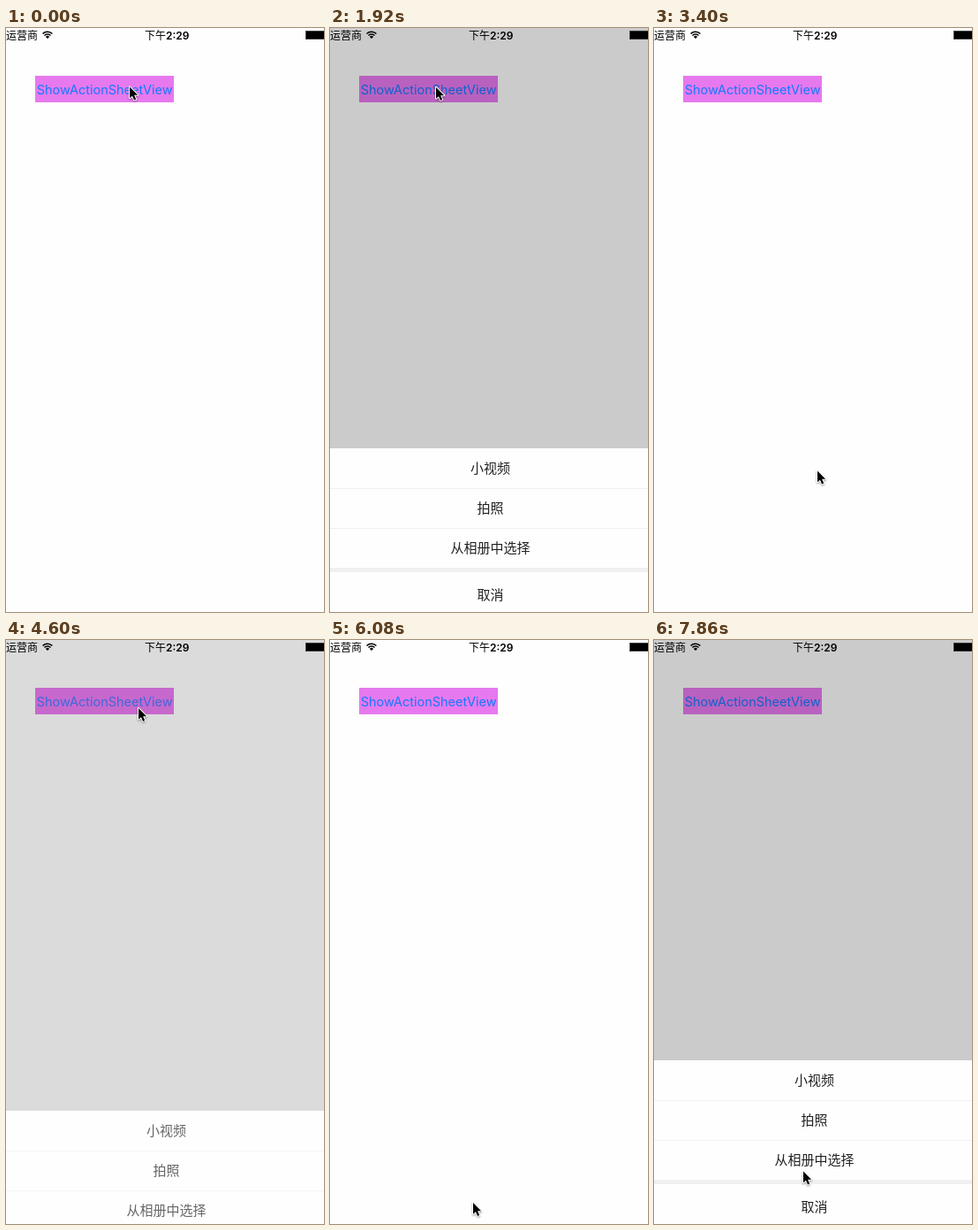
An HTML page with a canvas that plays this animation: 360 by 660 pixels, repeating every 8 s.

```html
<!DOCTYPE html>
<html lang="zh">
<head>
<meta charset="utf-8">
<title>Action sheet</title>
<style>
html, body { margin: 0; width: 360px; height: 660px; overflow: hidden; background: #fefefe; }
canvas { display: block; }
</style>
</head>
<body>
<canvas id="stage" width="360" height="660"></canvas>
<script>
const ctx = document.getElementById('stage').getContext('2d');
const W = 360, H = 660, LOOP = 8000, TICKS = 54, TICK = LOOP / TICKS;
const CJK = '"Noto Sans CJK SC", "Noto Sans CJK", sans-serif';
const LATIN = 'Inter, ' + CJK;
const ROW = 45, GAP = 5, SHEET = 185;
const LABELS = ['小视频', '拍照', '从相册中选择', '取消'];

const RAMP = 1.35;
const opens = [11.15, 30.15, 48.15];
const closes = [21.3, 39.3];

const spot = (x, y) => ({ x, y });
const START = spot(140, 66), BUTTON = spot(120, 66.5), BUTTON_RIGHT = spot(150, 76.5);
const VIDEO = spot(185, 500), ALBUM = spot(169, 600), CANCEL = spot(162, 635.5);

// Pointer legs, each eased from wherever the last one ended
const legs = [
  { at: 0, ticks: 6, to: BUTTON },
  { at: 14, ticks: 3, to: spot(205, 570) },
  { at: 17, ticks: 2, to: VIDEO },
  { at: 23, ticks: 6, to: BUTTON_RIGHT },
  { at: 31, ticks: 5, to: spot(157.5, 635.5) },
  { at: 36, ticks: 2, to: CANCEL },
  { at: 41, ticks: 5, to: BUTTON_RIGHT },
  { at: 50, ticks: 3, to: ALBUM }
];

const smooth = u => {
  u = Math.min(1, Math.max(0, u));
  return u * u * (3 - 2 * u);
};
const ramps = (starts, n) => starts.reduce((sum, s) => sum + smooth((n - s) / RAMP), 0);

const pointer = n => legs.reduce((pos, leg) => {
  const u = smooth((n - leg.at) / leg.ticks);
  return spot(pos.x + (leg.to.x - pos.x) * u, pos.y + (leg.to.y - pos.y) * u);
}, START);

function rect(color, x, y, w, h) {
  ctx.fillStyle = color;
  ctx.fillRect(x, y, w, h);
}

function text(str, x, y, font, color, align = 'left') {
  ctx.font = font;
  ctx.fillStyle = color;
  ctx.textAlign = align;
  ctx.fillText(str, x, y);
}

function wifi(x, y) {
  const a = -Math.PI * 0.75, b = -Math.PI * 0.25;
  ctx.strokeStyle = ctx.fillStyle = '#000';
  ctx.lineWidth = 1.6;
  for (const r of [7.7, 5]) {
    ctx.beginPath();
    ctx.arc(x, y, r, a, b);
    ctx.stroke();
  }
  ctx.beginPath();
  ctx.moveTo(x, y);
  ctx.arc(x, y, 3, a, b);
  ctx.fill();
}

function statusBar() {
  text('运营商', 0, 13, '400 12px ' + CJK, '#000');
  wifi(47, 12);
  text('下午', 157, 13, '500 12px ' + CJK, '#000');
  text('2:29', 181, 12.5, '600 12px ' + LATIN, '#000');
  rect('#444', 339, 3, 21, 10);
  rect('#000', 340, 4, 20, 8);
}

function button(alpha) {
  rect('#e779ee', 33, 54, 157, 30);
  ctx.globalAlpha = alpha;
  text('ShowActionSheetView', 111.7, 74.5, '400 14.5px ' + LATIN, '#147aff', 'center');
  ctx.globalAlpha = 1;
}

function sheet(p) {
  const top = Math.round(H - SHEET * p);
  rect('#fefefe', 0, top, W, H - top);
  ctx.globalAlpha = p;
  LABELS.forEach((label, i) => {
    const last = i === LABELS.length - 1;
    const y = top + ROW * i;
    if (i) rect('#f0f0f0', 0, y, W, last ? GAP : 1);
    text(label, 181.5, y + (last ? 36 : 28), '400 15px ' + CJK, '#222', 'center');
  });
  ctx.globalAlpha = 1;
}

function cursor({ x, y }) {
  ctx.save();
  ctx.translate(x, y + 0.5);
  ctx.scale(0.9, 0.9);
  const arrow = new Path2D('M0 0V14.3L3.3 11.3L5.7 16.6L8 15.6L5.7 10.4L10.2 10.2Z');
  ctx.lineJoin = 'round';
  ctx.lineWidth = 2.2;
  ctx.strokeStyle = '#fff';
  ctx.shadowColor = 'rgba(0,0,0,0.4)';
  ctx.shadowBlur = 2;
  ctx.shadowOffsetY = 1;
  ctx.stroke(arrow);
  ctx.shadowColor = 'transparent';
  ctx.fillStyle = '#000';
  ctx.fill(arrow);
  ctx.restore();
}

function draw(n) {
  const p = ramps(opens, n) - ramps(closes, n);
  const pressed = opens.some(o => n >= o - 0.3 && n < o + RAMP);
  rect('#fefefe', 0, 0, W, H);
  statusBar();
  button(pressed ? 0.2 + 0.8 * p : 1);
  if (p > 0.001) {
    rect(`rgba(0,0,0,${0.2 * p})`, 0, 0, W, H);
    sheet(p);
  }
  cursor(pointer(n));
}

const start = performance.now();
function loop() {
  const t = (performance.now() - start) % LOOP;
  draw(Math.floor((t + 15) / TICK) % TICKS);
  requestAnimationFrame(loop);
}
loop();
</script>
</body>
</html>
```
